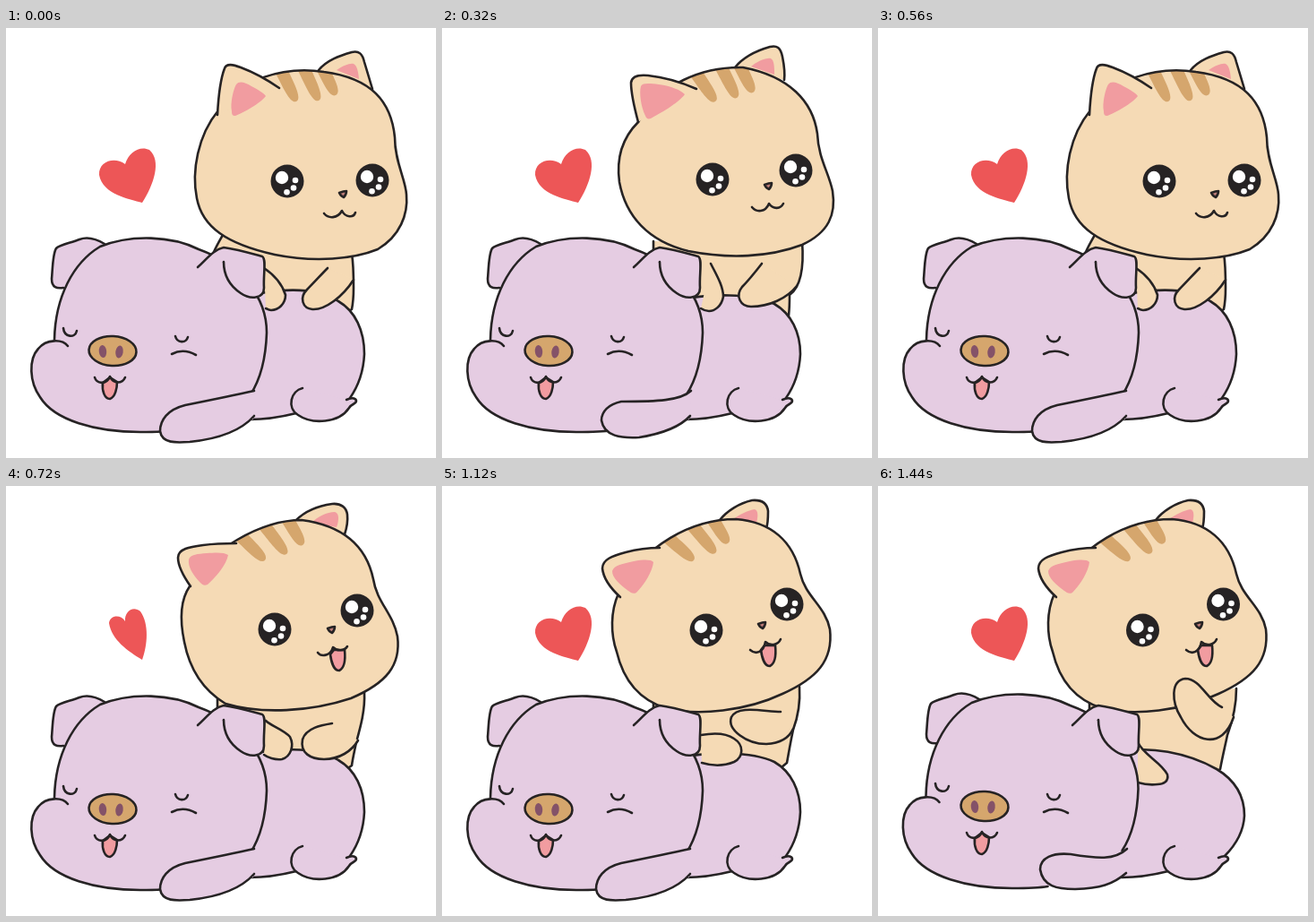
An HTML page with a canvas for the animation above (1.52 s loop, 480 px wide and 480 px high).

```html
<!DOCTYPE html>
<html>
<head>
<meta charset="utf-8">
<style>
html, body { margin: 0; width: 100%; height: 100%; overflow: hidden; background: #fff; }
canvas { display: block; width: 480px; height: 480px; }
</style>
</head>
<body>
<canvas id="stage" width="480" height="480"></canvas>
<script>
const ctx = document.getElementById('stage').getContext('2d');
const INK = '#262324', CAT = '#f5dab5', PINK = '#f19ca0', TAN = '#d5a66d', PIG = '#e5cce2', RED = '#ed5657';
const STEP = 80, LOOP = 1520;

const armLow = 'M277 405 C250 411 220 417 200 421 C180 426 172 438 172 450 C174 464 190 463 205 462 C235 459 262 450 277 433';
const armUp = 'M278 405 C266 416 240 417 200 417 C186 420 178 428 178 438 C181 456 200 458 220 457 C245 453 265 446 277 433';

const A = {
  head: 'M237 92 C214 120 207 160 213 190 C219 222 246 241 300 253 C345 262 388 258 415 247 C440 232 449 208 447 186 C446 168 434 150 434 122 C430 82 408 56 355 49 C310 42 258 58 237 92Z',
  earL: 'M236 97 C237 78 239 58 244 45 C246 39 254 41 262 44 C278 50 292 58 305 67',
  inL: 'M252 93 C250 84 254 68 257 63 C260 59 266 60 274 65 C282 69 288 73 290 76 C284 84 266 94 256 98 C253 98 252 97 252 93Z',
  earR: 'M349 47 C358 36 372 31 386 27 C394 25 398 29 400 38 C403 48 406 58 409 68',
  inR: 'M369 47 C376 42 384 39 388 40 C392 42 393 48 394 57',
  stripes: '308 49 324 82 333 46 349 81 355 48 368 75',
  eyes: '314 171 409 170',
  nose: '376 185',
  mouth: 'M355 207 C360 213 370 213 375 204 C379 212 388 212 390 206',
  tongue: '0',
  body: 'M242 231 C238 238 235 243 232 250 L270 330 L360 330 L386 314 C388 304 388 298 388 290 C388 278 388 264 386 252',
  pawL: 'M288 268 C300 276 308 285 312 298 C312 308 304 315 296 315 C294 315 292 314 290 313',
  pawR: 'M359 268 C352 275 344 284 336 292 C327 301 331 313 342 314 C356 315 376 300 388 281',
  back: 'M260 302 C300 290 345 288 371 305 C390 316 400 338 400 364 C399 385 393 400 384 413',
  arm: armLow,
  squash: '0'
};
const B = {
  head: 'M219 105 C199 125 195 150 198 172 C205 210 230 238 275 249 C320 258 365 256 402 242 C432 228 440 208 436 182 C432 162 420 145 419 118 C414 82 388 54 336 44 C290 43 244 62 219 105Z',
  earL: 'M219 105 C215 90 211 72 211 61 C212 53 220 52 230 53 C250 55 268 61 284 68',
  inL: 'M227 98 C222 88 220 72 222 65 C224 61 232 62 242 63 C256 65 266 69 271 74 C264 84 242 96 233 101 C230 102 228 101 227 98Z',
  earR: 'M327 44 C336 33 352 25 366 21 C374 19 378 22 380 32 C382 42 383 50 382 58',
  inR: 'M345 43 C352 37 362 33 367 34 C371 36 371 44 371 52',
  stripes: '286 54 305 82 313 46 329 78 334 45 347 72',
  eyes: '302 169 395 159',
  nose: '364 176',
  mouth: 'M346 200 C351 206 361 206 365 196 C370 203 378 202 381 196',
  tongue: '0',
  body: 'M236 238 C236 242 236 246 236 250 L270 330 L360 330 L387 321 C388 312 388 306 388 298 C402 288 404 264 402 238',
  pawL: 'M300 263 C306 275 314 288 314 300 C312 311 304 316 298 316 C295 316 292 315 289 313',
  pawR: 'M357 263 C350 272 343 281 335 289 C327 299 333 311 345 311 C365 311 385 302 396 288',
  back: 'M260 304 C300 296 345 296 371 308 C390 319 400 340 400 364 C399 385 393 400 384 413',
  arm: armUp,
  squash: '0'
};
const C = {
  ...A,
  head: 'M205 112 C194 128 194 150 199 174 C205 205 220 228 245 243 C285 255 340 252 385 237 C425 220 441 200 437 168 C432 142 414 130 410 104 C402 66 375 44 330 38 C285 38 225 72 205 112Z',
  earL: 'M206 112 C199 102 192 90 192 80 C192 70 205 68 220 66 C235 64 245 64 257 64',
  inL: 'M216 107 C208 98 203 90 204 82 C206 76 214 76 224 75 C236 74 244 74 248 77 C246 88 234 102 225 110 C221 112 219 110 216 107Z',
  earR: 'M324 38 C334 28 350 22 364 20 C374 19 380 24 381 32 C382 42 380 48 378 54',
  inR: 'M341 41 C348 34 358 29 367 29 C372 30 372 38 369 46',
  stripes: '264 58 289 83 290 46 313 76 316 40 331 66',
  eyes: '300 160 392 139',
  nose: '363 160',
  mouth: 'M348 186 C352 191 362 190 365 180 C370 185 378 184 381 179',
  tongue: '1',
  body: 'M236 238 C236 242 236 246 236 250 L270 330 L360 330 L386 312 C387 304 389 296 391 286 C396 268 401 250 400 230',
  pawL: 'M290 262 C296 268 310 272 317 280 C322 290 318 302 308 305 C300 306 292 303 288 300',
  pawR: 'M364 265 C352 267 335 270 331 283 C328 298 340 305 355 305 C372 305 386 296 393 284',
  back: 'M260 302 C300 292 345 290 371 306 C390 317 400 338 400 364 C399 385 393 400 384 413'
};
const D = {
  ...C,
  head: 'M197 120 C188 140 188 165 195 185 C202 215 218 238 250 248 C286 257 340 251 380 232 C418 215 437 195 433 160 C428 134 406 124 400 98 C392 62 368 40 328 37 C280 37 225 65 197 120Z',
  earL: 'M199 124 C188 114 180 102 179 92 C179 82 190 78 205 74 C220 70 232 69 243 69',
  inL: 'M208 117 C198 110 190 102 190 95 C192 88 202 87 214 84 C226 82 233 82 236 85 C235 95 226 110 217 119 C213 121 211 119 208 117Z',
  earR: 'M310 38 C318 28 332 19 346 16 C358 15 363 20 364 28 C364 36 364 42 362 47',
  inR: 'M325 37 C332 32 342 27 349 26 C353 27 353 34 351 41',
  stripes: '255 60 281 83 282 47 305 75 304 40 319 64',
  eyes: '295 161 385 132',
  nose: '357 155',
  mouth: 'M344 183 C351 189 359 185 361 174 C366 179 375 178 378 171',
  body: 'M236 238 C236 242 236 246 236 250 L270 330 L360 330 L385 309 C387 298 389 286 392 272 C398 256 400 240 399 224',
  pawL: 'M289 278 C300 276 316 275 326 282 C337 289 337 302 326 308 C314 313 300 312 290 309',
  pawR: 'M378 252 C360 252 330 244 323 258 C318 272 340 288 362 288 C380 287 388 280 392 271',
  back: B.back
};
const E = {
  ...D,
  eyes: '295.5 161 385.5 132',
  nose: '358 155',
  body: 'M236 238 C236 242 236 246 236 250 L270 330 L360 330 L382 316 C385 300 388 288 390 278 C396 262 400 244 400 226',
  pawL: 'M290 286 C296 300 316 308 323 322 C325 330 318 333 312 333 C304 334 297 333 290 331',
  pawR: 'M384 247 C368 240 360 215 343 215 C326 217 328 242 338 258 C352 286 384 296 397 258',
  back: 'M260 300 C300 286 350 300 378 316 C398 328 409 345 409 368 C408 388 398 402 387 413',
  arm: 'M278 405 C264 418 245 416 215 411 C195 409 181 415 181 428 C184 447 200 450 220 450 C248 449 262 445 277 432',
  squash: '1'
};

const poses = { A, B, C, D, E };
// Two letters stand for the pose halfway between both.
const beats = 'A AB B A B A B A AC C CD D E DE D DE E D E'.split(' ');

const nums = s => s.match(/-?[\d.]+/g).map(Number);

function blend(p, q) {
  const out = {};
  for (const k in p) {
    const to = nums(q[k]);
    let i = 0;
    out[k] = p[k].replace(/-?[\d.]+/g, n => (+n + to[i++]) / 2);
  }
  return out;
}
const frames = beats.map(([a, b]) => b ? blend(poses[a], poses[b]) : poses[a]);

function fill(d, color) {
  ctx.fillStyle = color;
  ctx.fill(new Path2D(d));
}
function line(d) {
  ctx.stroke(new Path2D(d));
}
function shape(d, color) {
  fill(d, color);
  line(d);
}
function oval(x, y, rx, ry, color, turn = 0) {
  ctx.beginPath();
  ctx.ellipse(x, y, rx, ry, turn, 0, 7);
  ctx.fillStyle = color;
  ctx.fill();
}
function shifted(x, y, draw) {
  ctx.save();
  ctx.translate(x, y);
  draw();
  ctx.restore();
}

// A rounded finger from the rim of the head to its tip.
function stripe(x, y, tx, ty) {
  const dx = tx - x, dy = ty - y, len = Math.hypot(dx, dy);
  const at = (along, side) => `${x + dx * along - dy / len * side} ${y + dy * along + dx / len * side}`;
  fill(`M${at(-.3, -7)} L${at(0, -7)} C${at(.4, -6.5)} ${at(1, -8)} ${at(1, 0)}
    C${at(1, 7)} ${at(.5, 6.5)} ${at(0, 7)} L${at(-.3, 7)}Z`, TAN);
}

function eye(x, y) {
  oval(x, y, 18.5, 18.5, INK);
  for (const [dx, dy, r] of [[-6, -4, 7.2], [-.5, 12.3, 3.3], [7, 7.5, 3.3], [9, -1, 3.3]])
    oval(x + dx, y + dy, r, r, '#fff');
}

function catHead(p) {
  shape(p.earR, CAT);
  fill(p.inR, PINK);
  fill(p.head, CAT);
  ctx.save();
  ctx.clip(new Path2D(p.head));
  const s = nums(p.stripes);
  for (let i = 0; i < 12; i += 4) stripe(...s.slice(i, i + 4));
  ctx.restore();
  line(p.head);
  shape(p.earL, CAT);
  fill(p.inL, PINK);
  const [lx, ly, rx, ry] = nums(p.eyes);
  eye(lx, ly);
  eye(rx, ry);
  shifted(...nums(p.nose), () => {
    if (+p.tongue > .5) shape('M-1 28 C0 36 3 46 9 46 C15 43 16 33 15 23 L3 23Z', PINK);
    shape('M-4 -1 Q1 -3 4 -3 Q4 1 1 4 Q-2 3 -4 -1Z', '#bd7c78');
  });
  line(p.mouth);
}

function pigBody(p) {
  fill(p.back + ' L324 430 C308 434 290 437 272 437Z', PIG);
  line(p.back);
  line('M324 430 C308 434 290 437 272 437');
  shape('M331 402 C318 405 313 424 326 432 C342 443 372 441 383 424 C386 419 391 420 391 416 C390 412 384 413 380 415', PIG);
}

function pigHead(p) {
  const q = +p.squash;
  const skull = 'M54 348 C55 300 75 262 105 244 C140 230 185 232 215 247 C262 264 291 300 291 340 C290 370 284 392 273 409';
  const jaw = ' C178 451 165 451 150 451 C100 451 54 438 38 412 C26 395 25 370 36 358 C45 347 63 347 69 355';
  shifted(3 * q, -3 * q, () =>
    shape('M110 241 C100 235 90 233 82 236 C72 240 60 242 56 246 C52 252 52 270 51 280 C51 290 57 291 64 290', PIG));
  shifted(-.5 * q, -2 * q, () => {
    fill(skull + ' L276 437 L190 449' + jaw, PIG);
    line(skull);
    line('M190 449' + jaw);
  });
  shifted(3 * q, 0, () =>
    shape('M214 267 C224 258 232 247 243 245 C258 247 275 252 286 255 C291 258 287 275 288 290 C288 303 272 303 262 296 C250 288 243 276 243 261', PIG));
  shifted(0, -3 * q, () => {
    line('M64 335 C65 345 77 347 79 338');
    oval(119, 360.5, 26.5, 16.5, TAN, .05);
    ctx.stroke();
    oval(108, 361, 4.2, 7, '#845268', -.1);
    oval(126.5, 361.5, 4.2, 7, '#845268', .15);
    shape('M108 396 C107 405 110 414 116 414 C122 412 124 402 124 395 L116 390Z', PINK);
    line('M99 390 C101 397 112 399 116 389 C120 398 130 397 133 390');
  });
  line('M189 344 C191 352 201 352 203 345');
  line('M185 364 Q198 357 212 365');
  shape(p.arm, PIG);
}

function heart(narrow) {
  fill(narrow
    ? 'M152 194 C136 184 118 172 115 153 C116 144 128 143 133 151 C132 140 142 133 150 140 C160 154 158 178 152 194Z'
    : 'M152 195 C138 191 108 186 104 164 C103 149 121 143 133 152 C137 138 150 131 160 136 C174 148 165 175 152 195Z', RED);
}

function draw(i) {
  const p = frames[i];
  ctx.fillStyle = '#fff';
  ctx.fillRect(0, 0, 480, 480);
  ctx.strokeStyle = INK;
  ctx.lineWidth = 2.6;
  ctx.lineCap = ctx.lineJoin = 'round';
  heart(i > 7 && i < 13);
  shape(p.body, CAT);
  pigBody(p);
  catHead(p);
  shape(p.pawL, CAT);
  shape(p.pawR, CAT);
  pigHead(p);
}

const start = performance.now();
function tick() {
  draw(Math.floor((performance.now() - start) % LOOP / STEP));
  requestAnimationFrame(tick);
}
tick();
</script>
</body>
</html>
```
